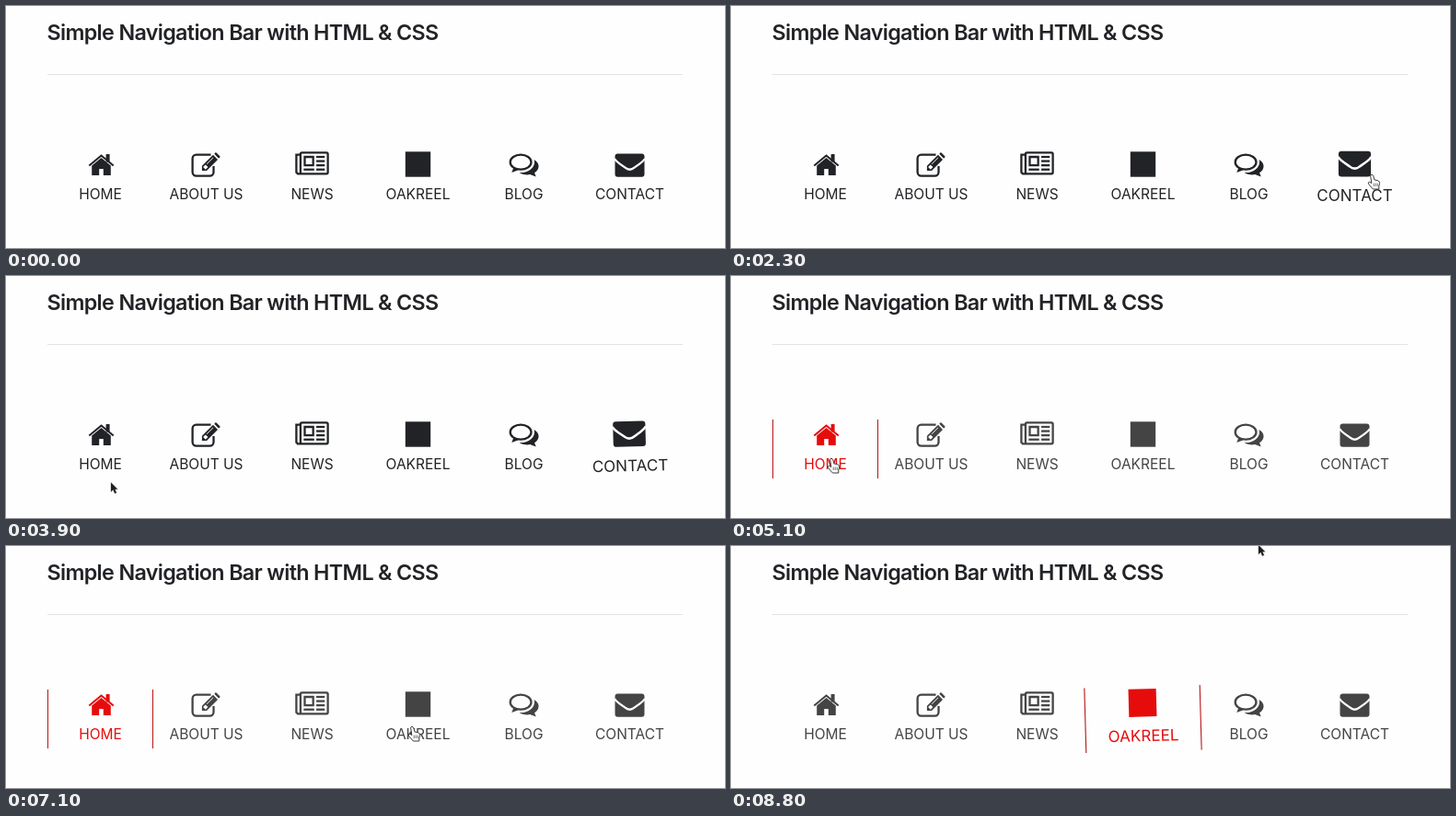
Write an HTML page with a canvas that moves like this. It is 781 px wide and 263 px high and loops after 8.9 s.

```html
<!DOCTYPE html>
<html lang="en">
<head>
<meta charset="utf-8">
<title>Simple Navigation Bar</title>
<style>
html, body { margin: 0; width: 100%; height: 100%; overflow: hidden; background: #fefefe; }
canvas { display: block; }
</style>
</head>
<body>
<canvas id="stage" width="781" height="263"></canvas>
<script>
const ctx = document.getElementById('stage').getContext('2d');
const LOOP = 8900, STEP = 100;
const CLICK_HOME = 5100, CLICK_REEL = 8000;
const PAPER = '#fefefe', INK = '#212326', GREY = '#444', RED = '#e60c0c', EDGE = '#b81515';
const BAR = { x: 45, y: 156, w: 690, h: 64 };
const CELL = BAR.w / 6;
const LINE = 16 / 7; // stroke of the icons

const mix = (a, b, k) => a + (b - a) * k;
const clamp = k => Math.max(0, Math.min(1, k));
const smooth = k => k * k * k * (k * (6 * k - 15) + 10);

// Shape helpers; icons are drawn around (0, 0).
function box(x, y, w, h, r = 0) {
  ctx.beginPath();
  ctx.roundRect(x, y, w, h, r);
  ctx.fill();
}

function frame(x, y, w, h, r = 0) {
  ctx.beginPath();
  ctx.roundRect(x, y, w, h, r);
  ctx.stroke();
}

function trace(...points) {
  ctx.beginPath();
  points.forEach(([x, y]) => ctx.lineTo(x, y));
}

function poly(...points) {
  trace(...points);
  ctx.fill();
}

function oval(x, y, rx, ry) {
  ctx.beginPath();
  ctx.ellipse(x, y, rx, ry, 0, 0, 2 * Math.PI);
}

function home() {
  ctx.translate(1, 0.5);
  ctx.lineWidth = 2.1;
  trace([-13.2, 1], [0, -10], [13.2, 1]);
  ctx.stroke();
  box(5.1, -11.4, 4, 8.5, 0.5);
  poly([0, -7.4], [10.3, 1.1], [10.3, 11.4], [-10.3, 11.4], [-10.3, 1.1]);
  ctx.fillStyle = PAPER;
  box(-2.3, 4.6, 4.6, 7);
}

function edit() {
  const left = -14.9, top = -10.3, right = 8, bottom = 12.6, r = 4;
  ctx.beginPath();
  ctx.moveTo(5, top);
  ctx.arcTo(left, top, left, bottom, r);
  ctx.arcTo(left, bottom, right, bottom, r);
  ctx.arcTo(right, bottom, right, top, r);
  ctx.lineTo(right, 2);
  ctx.stroke();
  // pencil, pointing along its own x axis
  ctx.translate(-4.6, 6.9);
  ctx.rotate(-Math.PI / 4);
  poly([0, 0], [3.6, -3.6], [20.6, -3.6], [20.6, 3.6], [3.6, 3.6]);
  box(22.2, -3.6, 2.6, 7.2, 1);
  ctx.fillStyle = PAPER;
  box(3.6, -1.9, 3.7, 3.8);
  box(8.7, -1.7, 9.8, 0.7);
}

function news() {
  frame(-12.6, -12.6, 29.7, 22.9, 1.5);
  trace([-13, -10.3], [-17.1, -10.3], [-17.1, 8.8], [-15.6, 10.3], [-12, 10.3]);
  ctx.stroke();
  frame(-8, -8, 4 * LINE, 4 * LINE);
  for (let i = 0; i < 4; i++) box(2 * LINE, (2 * i - 4) * LINE, 4 * LINE, LINE);
  box(-4 * LINE, 2 * LINE, 5 * LINE, LINE);
}

function badge() {
  box(-13.7, -13.7, 27.4, 27.4);
}

function chat() {
  const tail = (side, dy) => poly([side * 6.6, 11.1 + dy], [side * 13.2, 13.6 + dy], [side * 11.3, 8.5 + dy], [side * 5, 9 + dy]);
  oval(3.4, 2.3, 12.6, 9.1);
  ctx.fill();
  tail(1, 0);
  const ink = ctx.fillStyle;
  ctx.fillStyle = PAPER;
  oval(-3.4, -2.3, 14.9, 11.4);
  ctx.fill();
  ctx.fillStyle = ink;
  tail(-1, -2 * LINE);
  ctx.fillStyle = PAPER;
  oval(-3.4, -2.3, 11.4, 8);
  ctx.fill();
  ctx.stroke();
}

function mail() {
  box(-16, -11.4, 32, 25.1, 2.9);
  ctx.strokeStyle = PAPER;
  ctx.beginPath();
  ctx.moveTo(-16.5, -6);
  ctx.quadraticCurveTo(-15, -3.5, -11, -0.6);
  ctx.lineTo(-5, 3.6);
  ctx.quadraticCurveTo(0, 7.8, 5, 3.6);
  ctx.lineTo(11, -0.6);
  ctx.quadraticCurveTo(15, -3.5, 16.5, -6);
  ctx.stroke();
}

const items = [
  ['HOME', home], ['ABOUT US', edit], ['NEWS', news],
  ['OAKREEL', badge], ['BLOG', chat], ['CONTACT', mail]
];

// Items shake when the pointer enters and when it leaves.
const shakes = [
  { item: 5, start: 1950 }, { item: 5, start: 3133 },
  { item: 0, start: 4100 }, { item: 0, start: 5650, span: 700 },
  { item: 3, start: 6075 }, { item: 3, start: 8232 }
];

function shakeOf(item, t) {
  const hit = shakes.find(s => s.item === item && t >= s.start && t < s.start + (s.span || 1000));
  if (!hit) return { scale: 1, turn: 0 };
  const k = 10 * (t - hit.start) / (hit.span || 1000);
  const strength = Math.min(1, k, 10 - k);
  const wave = k < 2 ? -1 : -Math.cos(Math.PI * k);
  return {
    scale: 1 + 0.1 * strength * mix(-1, 1, clamp(k - 2)),
    turn: strength * wave * Math.PI / 60
  };
}

function drawItem([label, icon], i, t) {
  const clicked = t >= CLICK_HOME;
  const active = clicked && i === (t < CLICK_REEL ? 0 : 3);
  const { scale, turn } = shakeOf(i, t);
  ctx.save();
  ctx.translate(BAR.x + CELL * (i + 0.5), BAR.y + BAR.h / 2);
  ctx.rotate(turn);
  ctx.scale(scale, scale);
  if (active) {
    ctx.fillStyle = EDGE;
    box(-CELL / 2, -BAR.h / 2, 1, BAR.h);
    box(CELL / 2 - 1, -BAR.h / 2, 1, BAR.h);
  }
  ctx.fillStyle = ctx.strokeStyle = active ? RED : clicked ? GREY : INK;
  ctx.font = '400 15.5px Inter, "Liberation Sans", sans-serif';
  ctx.textAlign = 'center';
  ctx.fillText(label, 0, 22);
  ctx.translate(0, -16);
  ctx.lineWidth = LINE;
  icon();
  ctx.restore();
}

// Each move ends at (x, y); sag bends it below the bar.
const moves = [
  { start: 1500, end: 2300, x: 696, y: 183, sag: 0 },
  { start: 3000, end: 4000, x: 109, y: 198, sag: 48 },
  { start: 5600, end: 6200, x: 441, y: 196, sag: 48 },
  { start: 8050, end: 8800, x: 573, y: -1, sag: 0 }
];

function pointerAt(t) {
  let x = 727, y = 252;
  for (const m of moves) {
    const k = clamp((t - m.start) / (m.end - m.start));
    x = mix(x, m.x, smooth(k));
    y = mix(y, m.y, smooth(k)) + m.sag * Math.sqrt(Math.max(0, Math.sin(Math.PI * k)));
  }
  return [x, y];
}

const arrow = new Path2D('M0 0V10L2.4 7.8L4.1 11.8L6 11L4.3 7.2H7.2Z');
const hand = new Path2D('M-1.4 1.2Q0-.8 1.6 1.2L3 6L6.3 6.6Q8.4 7 8.6 9.5L7.8 13V16H1.4L-3.6 10.4Q-4.4 8.4-2.4 8.2L-.2 9.6Z');
const fingers = new Path2D('M2.2 9.6V13M4.2 9.6V13M6.2 9.6V13');

function drawPointer(t) {
  if (t < moves[0].start) return;
  const [x, y] = pointerAt(t);
  ctx.save();
  ctx.translate(x, y);
  ctx.lineJoin = 'round';
  if (y > BAR.y && y < BAR.y + BAR.h) {
    ctx.fillStyle = '#fff';
    ctx.strokeStyle = '#3a3a3a';
    ctx.lineWidth = 1;
    ctx.fill(hand);
    ctx.stroke(hand);
    ctx.lineWidth = 0.7;
    ctx.stroke(fingers);
  } else {
    ctx.fillStyle = '#1c1c1c';
    ctx.strokeStyle = '#ddd';
    ctx.lineWidth = 1.5;
    ctx.stroke(arrow);
    ctx.fill(arrow);
  }
  ctx.restore();
}

function draw(t) {
  ctx.fillStyle = PAPER;
  ctx.fillRect(0, 0, 781, 263);
  ctx.fillStyle = INK;
  ctx.font = '600 23.3px Inter, "Liberation Sans", sans-serif';
  ctx.letterSpacing = '-0.66px';
  ctx.textAlign = 'left';
  ctx.fillText('Simple Navigation Bar with HTML & CSS', 44.5, 37);
  ctx.letterSpacing = '0px';
  ctx.fillStyle = '#e3e3e3';
  ctx.fillRect(BAR.x, 74, BAR.w, 1);
  items.forEach((item, i) => drawItem(item, i, t));
  drawPointer(t);
}

const origin = performance.now();
function tick() {
  const t = (performance.now() - origin) % LOOP;
  draw(Math.floor(t / STEP) * STEP);
  requestAnimationFrame(tick);
}
tick();
</script>
</body>
</html>
```
